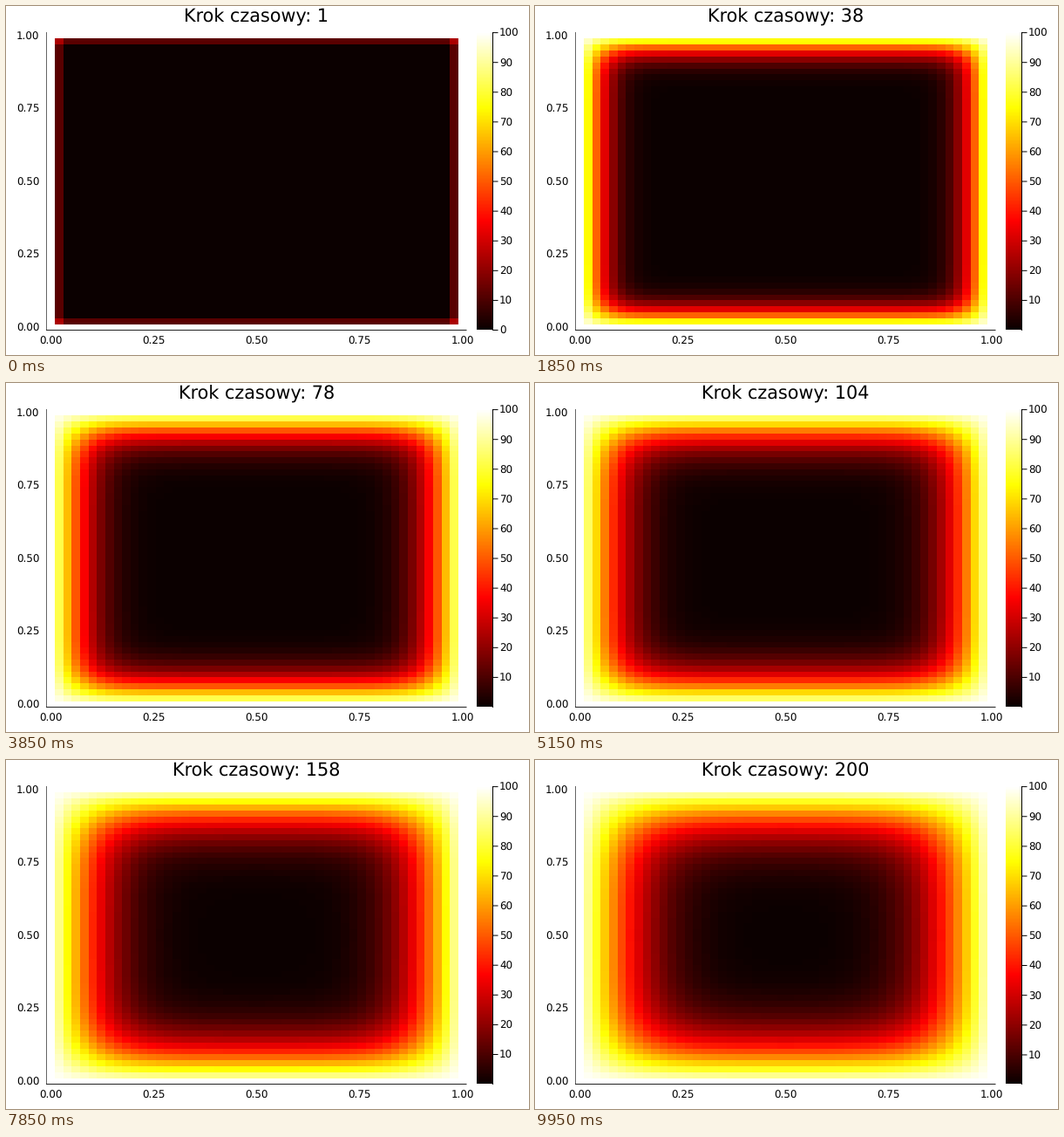
A matplotlib script for the animation above (10 s loop, 600 by 400 pixels).

```python
import numpy as np
import matplotlib.pyplot as plt
from matplotlib.animation import FuncAnimation

plt.rcParams["font.family"] = "DejaVu Sans"
plt.rcParams["text.hinting"] = "none"

W, H, DPI = 600, 400, 100
PX = 72 / DPI                      # points per pixel
STEPS, N = 200, 50
DIFFUSIVITY, DT, DX = 0.01, 0.005, 1 / (N - 1)
HOT = 100.0
LEFT, RIGHT, TOP, BOTTOM = 46.4, 528.6, 30.6, 371.5
BAR_LEFT, BAR_RIGHT = 540, 558
TEXT_DROP = 4.7                    # from a label's middle to its baseline


def simulate():
    """Explicit heat equation on a square plate with hot edges."""
    r = DIFFUSIVITY * DT / DX**2
    u = np.full((N, N), HOT)
    u[1:-1, 1:-1] = 0
    states = []
    for _ in range(STEPS):
        nxt = u.copy()
        nxt[1:-1, 1:-1] += r * (u[2:, 1:-1] + u[:-2, 1:-1] + u[1:-1, 2:]
                                + u[1:-1, :-2] - 4 * u[1:-1, 1:-1])
        u = nxt
        states.append(u)
    return states


states = simulate()

fig = plt.figure(figsize=(W / DPI, H / DPI), dpi=DPI, facecolor="white")
ax = fig.add_axes([0, 0, 1, 1])
ax.axis("off")


def label(x, y, text, ha, size=11.9):
    return ax.text(x, y, text, ha=ha, va="baseline", fontsize=size * PX, color="black")


def line(xs, ys, color="black"):
    return ax.plot(xs, ys, color=color, lw=PX, solid_capstyle="butt", snap=False)[0]


# a mesh keeps the fractional cell edges that an image would round away
heat = ax.pcolormesh(np.linspace(LEFT, RIGHT, N + 1), np.linspace(BOTTOM, TOP, N + 1),
                     states[0], cmap="hot", antialiased=False)
ax.imshow(np.arange(256)[:, None], cmap="hot", origin="lower", aspect="auto",
          interpolation="nearest", extent=(BAR_LEFT, BAR_RIGHT, 371, 30))

line([46.5, 46.5], [30, 372], "#666666")
line([46, 528.5], [371.5, 371.5], "#222222")
cell_w, cell_h = (RIGHT - LEFT) / N, (BOTTOM - TOP) / N
for v in np.linspace(0, 1, 5):
    x = LEFT + cell_w * (0.5 + v * (N - 1))
    y = BOTTOM - cell_h * (0.5 + v * (N - 1))
    label(x, 388, f"{v:.2f}", "center")
    label(38.4, y + TEXT_DROP, f"{v:.2f}", "right")

line([BAR_RIGHT + 0.5] * 2, [30, 372])
levels = np.arange(0, 101, 10)
ticks = [line([BAR_RIGHT, 564.5], [0, 0]) for _ in levels]
tick_labels = [label(566, 0, str(v), "left") for v in levels]
title = label(287.2, 18.6, "", "center", 20.8)

ax.set_xlim(0, W)
ax.set_ylim(H, 0)


def update(i):
    u = states[i]
    low = u.min()
    heat.set_array(u)
    heat.set_clim(low, HOT)
    title.set_text(f"Krok czasowy: {i + 1}")
    for v, tick, text in zip(levels, ticks, tick_labels):
        y = BOTTOM - (v - low) / (HOT - low) * (BOTTOM - TOP)
        tick.set_ydata([y, y])
        text.set_y(y + TEXT_DROP)
        # the scale starts at the coldest cell, so 0 drops off once it warms
        tick.set_visible(v >= low)
        text.set_visible(v >= low)
    return [heat, title, *ticks, *tick_labels]


anim = FuncAnimation(fig, update, frames=STEPS, interval=50,
                     init_func=lambda: update(0), repeat=True, repeat_delay=0)
plt.show()
```
